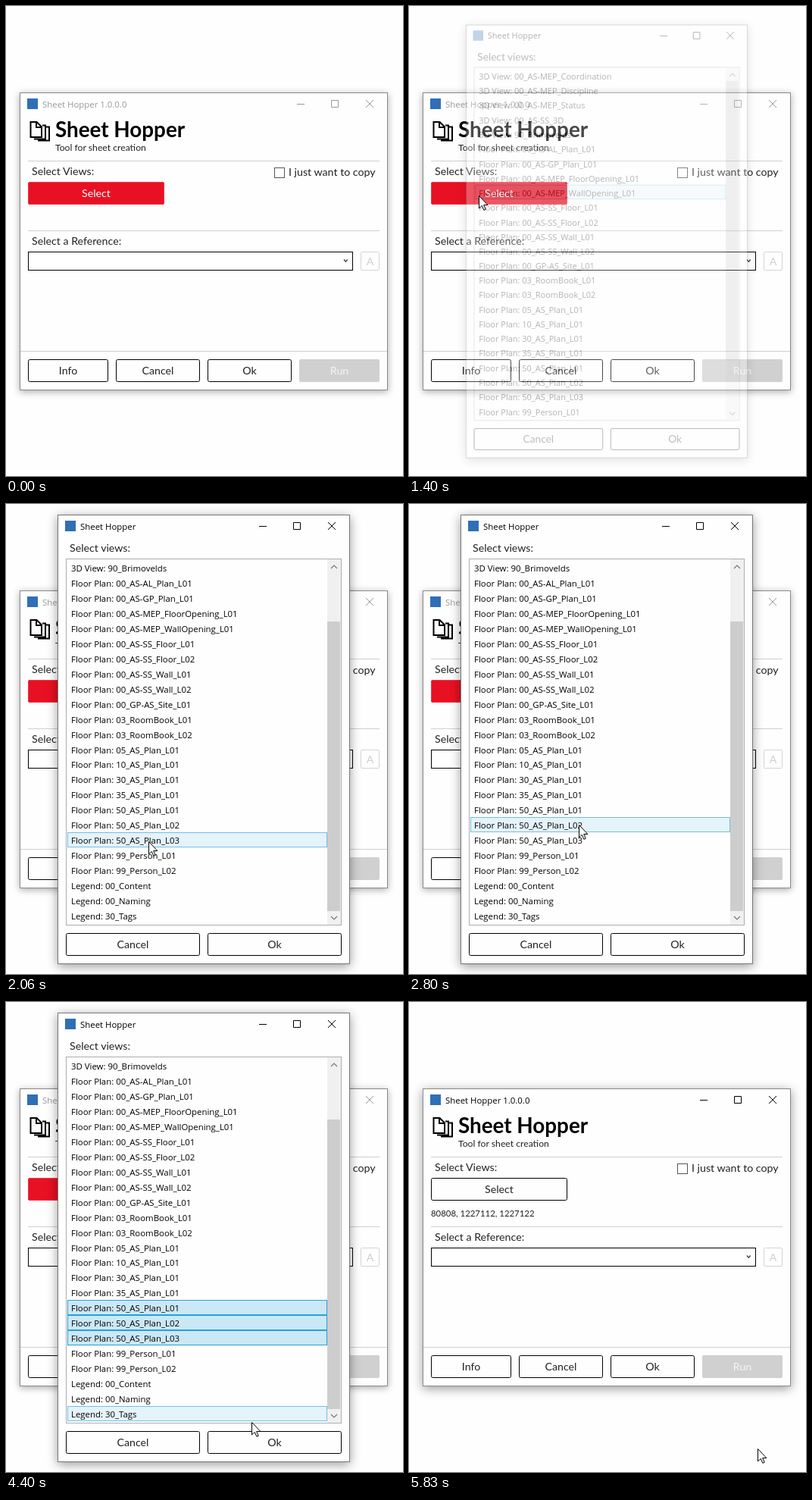
These frames come from a looping animation (524x620 px, 5860 ms). An HTML page:

```html
<!DOCTYPE html>
<html lang="en">
<head>
<meta charset="utf-8">
<title>Sheet Hopper</title>
<style>
  html, body { margin: 0; width: 100%; height: 100%; overflow: hidden; background: #fefefe; }
  svg { display: block; width: 524px; height: 620px; }
  text { font: 14.2px Lato, "Open Sans", sans-serif; fill: #222; white-space: pre; }
  .ui { font: 11.4px "Open Sans", "Noto Sans", sans-serif; fill: #000; }
  .mid { text-anchor: middle; }
  .line { stroke: #cfcfcf; fill: none; }
  .glyph { fill: none; stroke: currentColor; }
  .frame { fill: #fefefe; stroke: #8a8a8a; }
</style>
</head>
<body>
<svg id="stage" viewBox="0 0 524 620"></svg>
<script>
const LOOP = 5860, ROW = 19.96, LIST_TOP = 74, VISIBLE = 24, RED = "#e81123";
const APP = "Sheet Hopper";
const SHADOW = { active: "drop-shadow(0 3px 7px #0006)", idle: "drop-shadow(0 2px 5px #0005)" };

const plans = ["AL_Plan_L01", "GP_Plan_L01", "MEP_FloorOpening_L01", "MEP_WallOpening_L01",
  "SS_Floor_L01", "SS_Floor_L02", "SS_Wall_L01", "SS_Wall_L02"].map(n => "00_AS-" + n);
const items = [
  ...["00_AS-MEP_Coordination", "00_AS-MEP_Discipline", "00_AS-MEP_Status", "00_AS-SS_3D",
    "90_Brimovelds"].map(n => "3D View: " + n),
  ...[...plans, "00_GP-AS_Site_L01", "03_RoomBook_L01", "03_RoomBook_L02", "05_AS_Plan_L01",
    "10_AS_Plan_L01", "30_AS_Plan_L01", "35_AS_Plan_L01", "50_AS_Plan_L01", "50_AS_Plan_L02",
    "50_AS_Plan_L03", "99_Person_L01", "99_Person_L02"].map(n => "Floor Plan: " + n),
  ...["00_Content", "00_Naming", "30_Tags"].map(n => "Legend: " + n)
];

// Drawing helpers
const stage = document.getElementById("stage");
function add(parent, tag, attrs = {}, label) {
  const el = document.createElementNS("http://www.w3.org/2000/svg", tag);
  for (const key in attrs) el.setAttribute(key, attrs[key]);
  if (label) el.textContent = label;
  return parent.appendChild(el);
}
const box = (g, x, y, width, height, attrs) => add(g, "rect", { x, y, width, height, ...attrs });
const path = (g, d, attrs) => add(g, "path", { d, ...attrs });
const text = (g, x, y, label, attrs) => add(g, "text", { x, y, ...attrs }, label);

function button(g, x, y, w, label) {
  const cx = x + w / 2;
  box(g, x + .5, y + .5, w - 1, 29, { rx: 2, fill: "#fefefe", stroke: "#000" });
  text(g, cx, y + 20, label, { class: "mid" });
  const pressed = add(g, "g", { opacity: 0 });
  box(pressed, x + .5, y + .5, w - 1, 29, { rx: 2, fill: RED, stroke: "#ee3a48" });
  text(pressed, cx, y + 20, label, { class: "mid", style: "fill:#fff" });
  return pressed;
}

function titleBar(g, x, y, label, [min, max, close]) {
  box(g, x, y - 7, 14, 14, { fill: "#2f6fb5" });
  const bar = add(g, "g");
  text(bar, x + 20, y + 4.5, label, { class: "ui", style: "fill:currentColor" });
  path(bar, `M${min - 5} ${y + .5}h10M${max - 4.5} ${y - 4.5}h9v9h-9z`, { class: "glyph" });
  path(bar, `M${close - 5} ${y - 5}l10 10m0-10l-10 10`, { class: "glyph" });
  return bar;
}

// Main window
const main = add(stage, "g");
const mainFrame = box(main, 18.5, 114.5, 485, 392, { class: "frame" });
const mainBar = titleBar(main, 28, 129, APP + " 1.0.0.0", [389, 434, 480]);
path(main, "M32.5 153h8l6.5 6.5V173H32.5zM40 153v7h7M48 157.5h4V175.5H37M53 159.5h4V177.5H42",
  { fill: "none", stroke: "#000", "stroke-width": 2 });
text(main, 65, 172.5, APP, { style: "font-size:27.8px;font-weight:700;fill:#000" });
text(main, 65, 191, "Tool for sheet creation", { style: "font-size:12.2px" });
path(main, "M29 204.5H493M29 296.5H493M19 455.5H503", { class: "line" });
text(main, 34, 223, "Select Views:");
box(main, 354.5, 213.5, 13, 13, { fill: "#fff", stroke: "#555" });
text(main, 373, 224, "I just want to copy");
const selectPressed = button(main, 29, 232, 180, "Select");
const result = text(main, 29, 283, "80808, 1227112, 1227122", { style: "font-size:11.4px" });
text(main, 34, 315, "Select a Reference:");
box(main, 29.5, 324.5, 428, 24, { fill: "#fff", stroke: "#000" });
path(main, "M446 334.5l2.3 2.8 2.3-2.8", { class: "glyph", color: "#333", "stroke-width": 1.2 });
box(main, 468.5, 324.5, 24, 24, { rx: 1, fill: "#fefefe", stroke: "#d4d4d4" });
text(main, 480.5, 341.5, "A", { class: "mid", style: "fill:#cecece" });
button(main, 29, 466, 106, "Info");
button(main, 145, 466, 111, "Cancel");
button(main, 266, 466, 111, "Ok");
box(main, 387, 466, 106, 30, { rx: 2, fill: "#d0d0d0" });
text(main, 440, 486, "Run", { class: "mid", style: "fill:#f4f4f4" });

// Dialog
const dialog = add(stage, "g");
box(dialog, 68.5, 14.5, 385, 592, { class: "frame", style: `stroke:#777;filter:${SHADOW.active}` });
titleBar(dialog, 78, 29, APP, [339, 384, 430]);
text(dialog, 84, 63, "Select views:");
box(dialog, 79.5, 72.5, 363, 483, { fill: "#fefefe", stroke: "#abadb3" });
box(dialog, 424, 73, 18, 482, { fill: "#f0f0f0" });
const thumb = box(dialog, 424, 91, 17, 382, { fill: "#cdcdcd" });
path(dialog, "M429 85l4-4 4 4M429 544l4 4 4-4", { class: "glyph", color: "#777", "stroke-width": 1.2 });
const rows = Array.from({ length: VISIBLE }, (_, i) => {
  const top = LIST_TOP + i * ROW;
  return {
    back: box(dialog, 81.5, Math.floor(top) + .5, 342, 19, { fill: "none" }),
    label: text(dialog, 86, Math.round(top + 15), "", { class: "ui" })
  };
});
button(dialog, 79, 566, 177, "Cancel");
const okPressed = button(dialog, 266, 566, 177, "Ok");

const cursor = path(stage, "M0 0V16.4L3.8 12.9 6.4 18.8 8.7 17.8 6.2 12H11.4Z",
  { fill: "#fff", stroke: "#000" });

// Motion tables: [time, values..., easing into this key]
const smooth = p => p * p * (3 - 2 * p), linear = p => p;
const easeIn = p => p * p, easeOut = p => 1 - (1 - p) ** 2;

const cursorKeys = [
  [500, 512, 168], [860, 98, 262, smooth], [1040, 92, 250, smooth],
  [1530, 92, 250], [1660, 160, 301, easeIn], [1700, 160, 301], [1940, 188, 445, easeOut],
  [2300, 188, 445], [2800, 224, 423, smooth], [3000, 224, 423], [3160, 222, 404, smooth],
  [3430, 222, 404], [3730, 231, 445, smooth], [4100, 231, 445], [4530, 350, 584, smooth],
  [5630, 350, 584], [5830, 460, 589, smooth]
];
const selectKeys = [[500, 1], [600, 0], [900, 0], [1040, 1], [5330, 1], [5480, 0]];
const okKeys = [[4830, 0], [5030, 1]];
const fadeKeys = [[1360, 0], [1400, .28], [1530, 1], [5300, 1], [5480, 0]];
const scaleKeys = [[1360, .95], [1400, .964], [1580, 1, easeOut], [5300, 1], [5480, .92, easeIn]];

function sample(keys, t, channel = 1) {
  const next = keys.findIndex(k => k[0] > t);
  if (next < 0) return keys[keys.length - 1][channel];
  if (next === 0) return keys[0][channel];
  const a = keys[next - 1], b = keys[next], last = b[b.length - 1];
  const ease = typeof last === "function" ? last : linear;
  return a[channel] + (b[channel] - a[channel]) * ease((t - a[0]) / (b[0] - a[0]));
}

const paint = (el, fill, stroke) => {
  el.setAttribute("fill", fill);
  el.setAttribute("stroke", stroke);
};

function drawList(t) {
  const offset = t < 1830 ? 0 : t < 1960 ? 3 : 4;
  // The hovered row trails the pointer slightly.
  const hover = Math.floor((sample(cursorKeys, t - 20, 2) - LIST_TOP) / ROW);
  const lastSelected = t < 3430 ? -1 : t < 3930 ? 20 : 22;
  thumb.setAttribute("y", 91 + offset * 16);
  rows.forEach(({ back, label }, i) => {
    const index = i + offset, name = items[index];
    if (label.textContent !== name) label.textContent = name;
    if (index >= 20 && index <= lastSelected) {
      if (t < 5260) paint(back, "#cbe8f6", "#26a0da");
      else paint(back, "#f6f6f6", "#dadada");
    } else if (i === hover) paint(back, "#e5f3fb", "#70c0e7");
    else paint(back, "none", "none");
  });
}

function draw(t) {
  const active = t >= 5330;
  mainBar.setAttribute("color", active ? "#000" : "#999");
  mainFrame.style.filter = active ? SHADOW.active : SHADOW.idle;
  result.setAttribute("visibility", active ? "visible" : "hidden");
  selectPressed.setAttribute("opacity", sample(selectKeys, t));
  okPressed.setAttribute("opacity", sample(okKeys, t));

  const fade = sample(fadeKeys, t), scale = sample(scaleKeys, t);
  dialog.setAttribute("opacity", fade);
  dialog.setAttribute("visibility", fade ? "visible" : "hidden");
  dialog.setAttribute("transform", `translate(261 310) scale(${scale}) translate(-261 -310)`);
  drawList(t);

  const x = Math.round(sample(cursorKeys, t, 1)), y = Math.round(sample(cursorKeys, t, 2));
  cursor.setAttribute("transform", `translate(${x + .5} ${y + .5})`);
  cursor.setAttribute("visibility", t < 500 ? "hidden" : "visible");
}

const start = performance.now();
function tick() {
  draw((performance.now() - start) % LOOP);
  requestAnimationFrame(tick);
}
tick();
</script>
</body>
</html>
```
